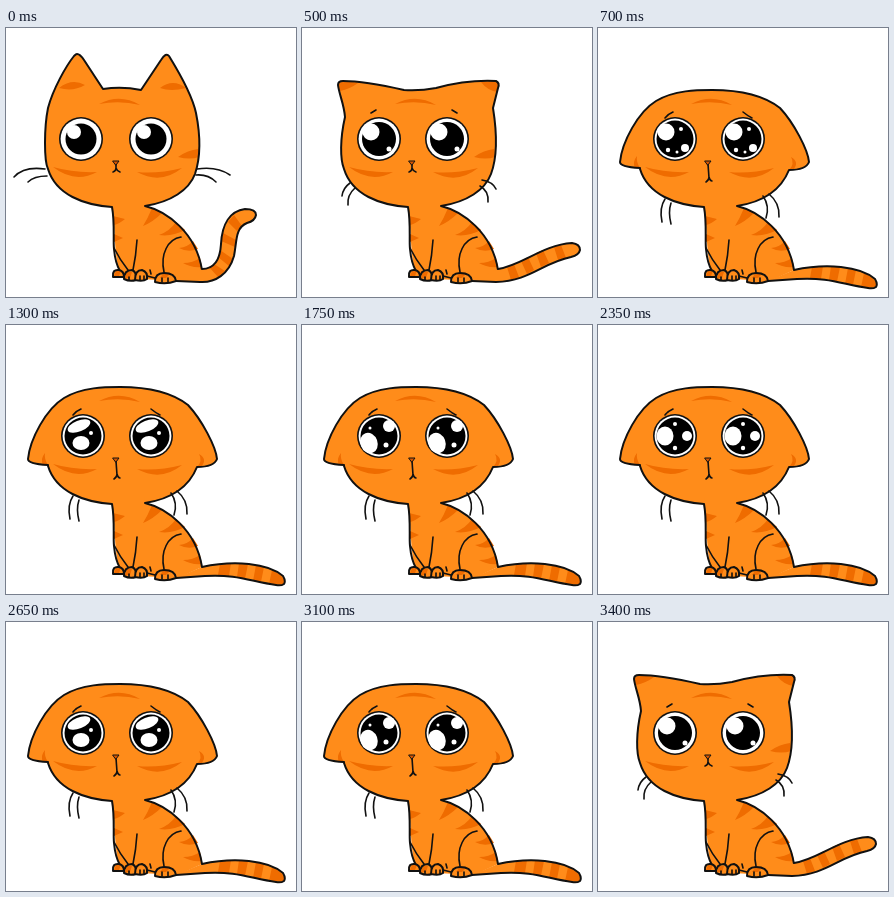
Recreate the animation shown at these times as an HTML page. Size 290 by 269 pixels, loop 3.6 s.

```html
<!DOCTYPE html>
<html lang="en">
<head>
<meta charset="utf-8">
<title>Sad cat</title>
<style>
html, body { margin: 0; width: 100%; height: 100%; overflow: hidden; background: #fff }
svg { display: block; width: 100vw; height: 100vh }
path { stroke-linecap: round; stroke-linejoin: round }
.fur { fill: #ff8c1a }
.stripe { fill: #ef6c00 }
.outline { fill: none; stroke: #111; stroke-width: 2 }
.line { fill: none; stroke: #111; stroke-width: 1.6 }
</style>
</head>
<body>
<svg viewBox="0 0 290 269"><g id="head"></g><g id="body"></g><g id="tail"></g><g id="paws"></g><g id="eyes"></g></svg>
<script>
const LOOP = 3600;
const path = (cls, d) => `<path class="${cls}" d="${d}"/>`;
const shape = (d, marks = '') => path('fur', d) + path('stripe', marks) + path('outline', d);
const circle = (x, y, r, fill) => `<circle cx="${x}" cy="${y}" r="${r}" fill="${fill}"/>`;
const oval = (x, y, rx, ry, turn) =>
  `<ellipse rx="${rx}" ry="${ry}" fill="#fff" transform="translate(${x} ${y}) rotate(${turn})"/>`;
const put = (id, html) => document.getElementById(id).innerHTML = html;

const chin = 'C183 162 165 174 139 178L106 179C78 177 50 167 42 141';
const faceMarks = 'M93 76Q114 65 134 77Q114 72 93 76Z' +
  'M47 139Q68 145 91 144Q69 156 47 139ZM131 144Q152 146 176 140Q155 157 131 144Z';
const smallMouth = 'M110 136V140M107 144Q110 143 110 140Q111 143 114 144';

const poses = {
  calm: {
    head: 'M71 26Q74 26 78 32L97 61Q116 58 135 62L155 32Q160 24 163 28C171 41 186 66 190 85C194 105 195 128 189 146' +
      chin + 'C38 133 38 100 42 80C47 61 60 38 68 28Q70 26 71 26Z',
    marks: 'M53 60Q66 50 79 57Q67 64 53 60ZM154 60Q167 50 180 60Q165 64 154 60ZM192 121Q182 122 172 129Q184 132 193 129Z',
    whiskers: 'M39 141Q18 138 8 149M41 148Q28 148 22 154M191 141Q211 138 224 147M190 147Q202 146 210 154',
    mouth: smallMouth,
    tail: 'M196 241C208 241 214 233 215 216C216 196 224 183 239 181Q250 181 250 187Q249 193 241 195C229 200 231 213 228 228C223 246 209 255 194 254L170 253',
    bands: 'M228 187L236 198 231 203 222 194ZM217 205L230 212 229 219 215 213ZM214 222L227 231 223 238 212 229ZM208 236L219 243 212 249 203 239Z',
    eyeX: [75, 145], pupil: 15.5
  },
  wary: {
    head: 'M36 57Q36 53 41 53C61 53 80 57 102 62Q118 63 134 60C156 54 174 52 194 53Q198 55 196 60L191 80C195 105 195 130 189 146' +
      chin + 'C38 131 38 111 43 89C42 76 37 66 36 57Z',
    marks: 'M38 63Q48 61 56 55L41 53 36 57ZM179 54Q185 62 195 64L197 56 194 53ZM192 121Q182 122 172 129Q184 132 193 129Z',
    whiskers: 'M48 155Q41 160 40 168M53 160Q45 167 46 177M180 152Q191 154 194 161M178 158Q187 163 186 174M69 85L74 82M150 82L155 85',
    mouth: smallMouth,
    tail: 'M196 241C221 237 240 217 270 215Q278 216 278 222Q277 227 269 229C240 235 228 253 194 254L170 253',
    bands: 'M252 219L259 217 264 230 256 232ZM234 225L241 222 247 235 239 239ZM219 233L226 229 232 242 225 246ZM205 239L212 236 217 249 209 252Z',
    eyeX: [77, 145], pupil: 17
  },
  sad: {
    head: 'M42 140Q22 139 22 134C24 114 40 84 58 73C76 62 100 62 114 62C145 62 168 69 182 80C196 95 210 122 211 134Q208 142 191 142' +
      chin + 'Z',
    marks: 'M39 128Q34 134 37 140L42 140Q38 134 39 128ZM193 129Q202 134 195 142L191 142Q197 136 193 129Z',
    whiskers: 'M67 171Q61 180 64 194M73 175Q70 184 73 196M165 168Q172 178 168 190M171 166Q182 175 181 189' +
      'M67 90Q70 86 75 84M145 84Q150 88 154 90',
    mouth: 'M110 136L111 150M108 154Q111 152 111 149Q112 153 114 153',
    tail: 'M196 242C228 235 262 238 277 251Q280 256 278 259Q275 261 270 260C246 257 232 249 199 251L170 253',
    bands: 'M214 239L225 238 223 251 212 250ZM233 238L242 239 239 254 231 252ZM250 240L258 242 255 257 247 256ZM266 245Q280 252 278 259L263 259Z',
    eyeX: [77, 145], pupil: 18.5
  }
};

// Highlights as [x, y, rx, ry, turn] from the pupil's centre
const calmGlint = [[-7, -7, 7, 7, 0]];
const waryGlint = [[-8, -7, 8.5, 8.5, 0], [10, 10, 2.5, 2.5, 0]];
const glints = [
  [[-9, -7, 8.5, 8.5, 0], [10, 9, 4, 4, 0], [-7, 11, 2.2, 2.2, 0], [6, -10, 2, 2, 0], [2, 13, 1.5, 1.5, 0]],
  [[-10, 0, 8.5, 9.5, 0], [12, 0, 5, 5, 0], [0, 12, 2.2, 2.2, 0], [0, -12, 2, 2, 0]],
  [[-10, 7, 8.5, 10.5, -20], [10, -10, 6, 6, 0], [7, 9, 2.5, 2.5, 0], [-9, -8, 1.5, 1.5, 0]],
  [[-4, -10, 12, 5.5, -22], [-2, 7, 8.5, 7, 0], [8, -3, 2, 2, 0]]
];

const back = 'M139 178C160 183 190 204 196 242';
const front = 'M106 179C109 195 107 212 108 221C109 232 111 238 114 243';
put('body',
  path('fur', 'M107 172H138L139 178C160 183 190 204 196 242L172 253 116 250C107 232 110 200 106 179Z') +
  path('stripe', 'M107 188L119 191Q113 196 108 197ZM108 206L117 210 108 214Z' +
    'M146 180L156 185Q147 194 137 198Q142 190 146 180ZM170 194L179 202Q166 209 153 207Q164 203 170 194Z' +
    'M187 213L192 221Q182 225 173 220Q182 219 187 213ZM194 230L196 239Q185 240 177 235Q187 235 194 230Z') +
  path('outline', back + front) +
  path('line', 'M108 220Q114 232 122 242M131 212Q130 228 127 242M141 248L149 250M144 242L145 246'));

put('paws',
  shape('M107 249Q106 241 113 242Q118 243 118 249Z', 'M108 248L110 243H115L113 248Z') +
  shape('M118 251Q118 242 126 242Q131 244 130 252Q124 254 118 251Z', 'M119 250L121 244H126L124 250Z') +
  shape('M129 252Q129 242 136 242Q142 244 141 251Q137 254 129 252Z') +
  shape('M149 254Q149 245 158 245Q169 245 170 253Q160 257 149 254Z', 'M154 250L157 246H164L160 250Z') +
  path('line', 'M158 244C154 226 162 211 175 209M123 249V252M134 248V252M138 248V252M156 250V254M162 250V254'));

function drawPose(p) {
  put('tail', shape(p.tail, p.bands));
  put('head', shape(p.head, faceMarks + p.marks) + path('line', p.whiskers + p.mouth) +
    '<path d="M107 133H113L110 137Z" fill="#d95500" stroke="#111"/>');
}

function drawEyes(p, glint) {
  const y = 111;
  put('eyes', p.eyeX.map(x => circle(x, y, 22, '#111') + circle(x, y, 20.4, '#fff') +
    circle(x, y, p.pupil, '#000') +
    glint.map(([dx, dy, ...rest]) => oval(x + dx, y + dy, ...rest)).join('')).join(''));
}

// The wet eyes hold for 300 ms, then shimmer in 150 ms steps; this runs twice
function stateAt(t) {
  if (t < 500) return ['calm', calmGlint];
  if (t < 700 || t >= 3400) return ['wary', waryGlint];
  const u = t - 700;
  const step = Math.floor((u < 1350 ? u : u - 1350) / 150);
  // The second round goes on from the first after its own 300 ms hold
  return ['sad', glints[Math.max(0, step - 1) % 4]];
}

let lastPose, lastGlint;
function frame(now) {
  const [name, glint] = stateAt(now % LOOP);
  if (name !== lastPose) drawPose(poses[name]);
  if (name !== lastPose || glint !== lastGlint) drawEyes(poses[name], glint);
  [lastPose, lastGlint] = [name, glint];
  requestAnimationFrame(frame);
}
frame(performance.now());
</script>
</body>
</html>
```
